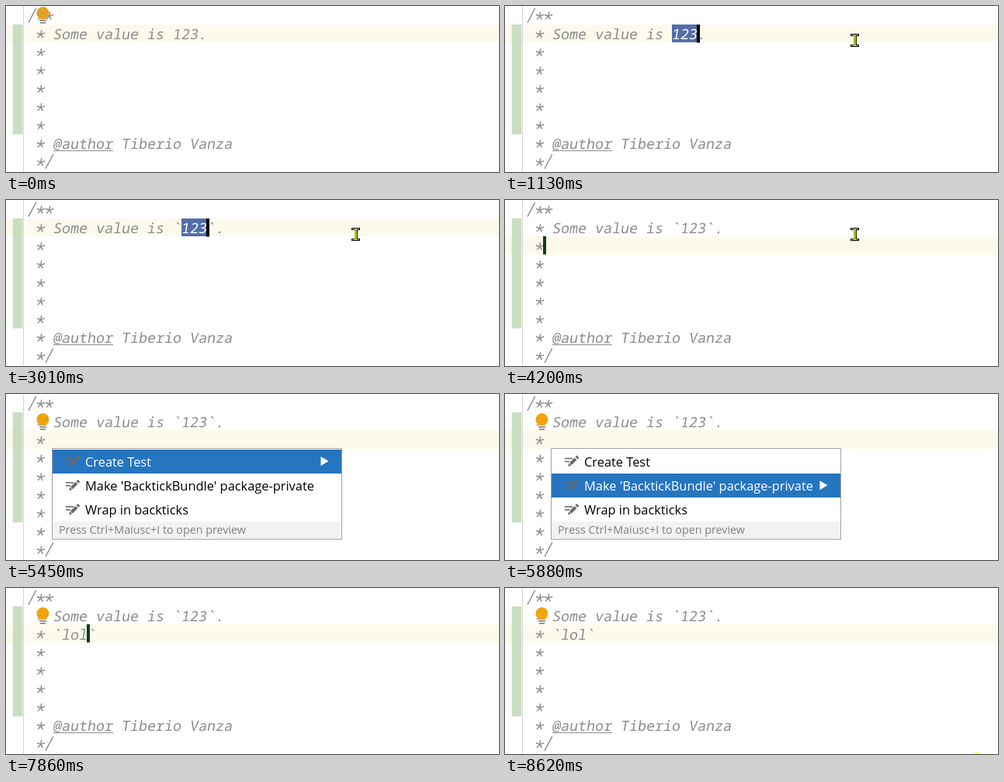
Recreate the animation shown at these times as an HTML page with a canvas. Size 635 by 215 pixels, loop 8.75 s.

```html
<!DOCTYPE html>
<html lang="en">
<head>
<meta charset="utf-8">
<style>
html, body { margin: 0; width: 100%; height: 100%; overflow: hidden; background: #fff; }
canvas { display: block; }
</style>
</head>
<body>
<canvas id="stage" width="635" height="215"></canvas>
<script>
const ctx = document.getElementById('stage').getContext('2d');
const LOOP = 8750, COL = 11, ROW = 23.67, LEFT = 28, GRAY = '#8c8c8c';
const CODE = '18.33px "Noto Sans Mono", monospace';
const UI = '"Open Sans", sans-serif';
const ITEMS = ['Create Test', "Make 'BacktickBundle' package-private",
  'Wrap in backticks', 'Adjust code style settings'];

// Each track is a list of [start time, value]; values hold until the next entry.
const BULB = [[0, 0], [730, null], [1510, 0], [3010, null], [5380, 1], [6310, null], [7860, 1]];
const CARET = [[0, null], [730, [1, 19]], [800, [1, 20]], [1600, null], [2940, [1, 20]],
  [3010, [1, 21]], [3770, [1, 22]], [4200, [2, 2]], [4950, [2, 3]], [5380, null],
  [6310, [2, 4]], [6690, [2, 5]], [6870, [2, 6]], [7000, [2, 7]], [8040, null]];
const SELECTION = [[0, null], [800, 17], [3010, 18], [3640, null]];
const TYPED = [[0, ''], [6310, '``'], [6690, '`l`'], [6870, '`lo`'], [7000, '`lol`']];
const MENU = [[0, null],
  [1600, [246.5, 46.5, 4, 0]], [2250, [246.5, 46.5, 4, 1]], [2370, [246.5, 46.5, 4, 2]], [2940, null],
  [5420, [59.5, 70.5, 3, 0]], [5880, [59.5, 70.5, 3, 1]], [6010, [59.5, 70.5, 3, 2]], [6260, null]];

const at = (track, t) => track.findLast(([start]) => start <= t)[1];
const colX = col => LEFT + col * COL;
const rowY = row => Math.round(row * ROW);

function rect(color, x, y, w, h) {
  ctx.fillStyle = color;
  ctx.fillRect(x, y, w, h);
}

function line(...points) {
  ctx.beginPath();
  points.forEach(([x, y]) => ctx.lineTo(x, y));
  ctx.stroke();
}

function label(text, x, y, font, color) {
  ctx.font = font;
  ctx.fillStyle = color;
  ctx.fillText(text, x, y);
}

// Slanted code text; asterisks have five arms and slashes are long strokes.
function code(text, row, col, color = GRAY) {
  ctx.save();
  ctx.transform(1, 0, -0.16, 1, colX(col) - 0.7, 19.5 + row * ROW);
  label(text.replace(/[*/]/g, ' '), 0, 0, CODE, color);
  ctx.strokeStyle = color;
  ctx.lineWidth = 1.5;
  [...text].forEach((char, i) => {
    const x = i * COL;
    if (char === '/') line([x + 2, 2], [x + 8.8, -16.5]);
    if (char !== '*') return;
    for (let arm = 0; arm < 5; arm++) {
      const angle = (arm * 0.4 - 0.5) * Math.PI;
      line([x + 5.5, -6.5], [x + 5.5 + 5.4 * Math.cos(angle), -6.5 + 5.4 * Math.sin(angle)]);
    }
  });
  ctx.restore();
}

function bulb(row) {
  const y = 9 + row * 24;
  ctx.fillStyle = row ? '#f0a30a' : '#e2a224';
  ctx.beginPath();
  ctx.arc(47.5, y, 8, 0.72 * Math.PI, 0.28 * Math.PI);
  ctx.lineTo(51, y + 8);
  ctx.lineTo(44, y + 8);
  ctx.fill();
  rect('#747474', 43, y + 9, 9, 1.5);
  rect('#747474', 44, y + 12, 7, 1.5);
}

function pencil(x, y) {
  ctx.strokeStyle = ctx.fillStyle = '#6a6a6a';
  ctx.lineWidth = 1.6;
  line([x, y + 2.5], [x + 10, y + 2.5]);
  line([x, y + 6.5], [x + 6, y + 6.5]);
  ctx.lineWidth = 4;
  line([x + 7.5, y + 9.5], [x + 14, y + 3]);
  line([x + 15, y + 2], [x + 17, y]);
  ctx.beginPath();
  ctx.moveTo(x + 4, y + 13);
  ctx.lineTo(x + 5.5, y + 8.5);
  ctx.lineTo(x + 8.5, y + 11.5);
  ctx.fill();
}

function menu([x, y, count, selected]) {
  const step = 31.25, height = count * step;
  rect('#fff', x, y, 373, height + 24);
  rect('#f2f2f2', x, y + 1 + height, 373, 23);
  ITEMS.slice(0, count).forEach((text, i) => {
    const top = y + 1 + i * step, active = i === selected;
    if (active) {
      rect('#2675bf', x + 0.5, Math.round(top), 372, 31);
      ctx.fillStyle = '#fff';
      ctx.beginPath();
      ctx.moveTo(x + 346, top + 9.5);
      ctx.lineTo(x + 356, top + 15.5);
      ctx.lineTo(x + 346, top + 21.5);
      ctx.fill();
    }
    pencil(x + 17.5, top + 9.5);
    label(text, x + 42.5, top + 22, '16.4px ' + UI, active ? '#fff' : '#000');
  });
  label('Press Ctrl+Maiusc+I to open preview', x + 8.5, y + height + 17, '14.3px ' + UI, '#808080');
  ctx.strokeStyle = '#a3a3a3';
  ctx.lineWidth = 1;
  ctx.strokeRect(x, y, 373, height + 24);
}

function pointer(t) {
  const glide = (start, step, first, count, [x0, y0], [x1, y1]) => {
    const p = Math.min(1, (Math.floor((t - start) / step) + first) / count);
    return [Math.round(x0 + (x1 - x0) * p), Math.round(y0 + (y1 - y0) * p)];
  };
  if (t < 100 || (t >= 4950 && t < 8040) || t >= 8440) return null;
  if (t < 1010) return glide(100, 70, 0, 9, [371, 170], [233, 28]);
  if (t < 4950) return glide(1010, 60, 1, 3, [233, 28], [451, 45]);
  return glide(8040, 66, 0, 6, [455, 60], [608, 222]);
}

function ibeam([x, y]) {
  for (const top of [y - 9, y + 5]) {
    rect('#000', x - 6, top, 11, 3);
    rect('#c8c8a0', x - 5, top + 1, 9, 1);
  }
  rect('#a3c21c', x - 2, y - 7, 3, 13);
  rect('#1c2400', x + 1, y - 6, 1, 11);
}

function draw(t) {
  rect('#fff', 0, 0, 635, 215);
  const current = t < 4200 ? 1 : 2;
  const top = rowY(current), height = rowY(current + 1) - top;
  rect('#fcfaed', 0, top, 635, height);
  rect('#fff', 27, top, 1, height);
  rect('#c9dec1', 8.7, 23.7, 12.6, 142.6);
  rect('#d4d4d4', 22, 0, 1, 215);

  code('/**', 0, 0);
  code(` * Some value is ${t < 3010 ? '123' : '`123`'}.`, 1, 0);
  code(' * ' + at(TYPED, t), 2, 0);
  for (let row = 3; row < 7; row++) code(' *', row, 0);
  code(' * @author Tiberio Vanza', 7, 0);
  rect(GRAY, 61, 187, 77, 1);
  code(' */', 8, 0);

  const selection = at(SELECTION, t);
  if (selection !== null) {
    rect('#526eaa', colX(selection), 24, 33, 23);
    code('123', 1, selection, '#fff');
  }
  const caret = at(CARET, t);
  if (caret) rect(caret[0] === 1 ? '#000' : '#123c1c', colX(caret[1]) - 1, rowY(caret[0]), 4, 23.5);
  const bulbRow = at(BULB, t);
  if (bulbRow !== null) bulb(bulbRow);
  const open = at(MENU, t);
  if (open) menu(open);

  const position = pointer(t);
  if (position) ibeam(position);
  if (t >= 8440) {
    ctx.fillStyle = '#ffff55';
    ctx.beginPath();
    ctx.arc(608, t < 8620 ? 225.5 : 225, 12.5, 0, 2 * Math.PI);
    ctx.fill();
  }
}

const begin = performance.now();
function tick() {
  draw((performance.now() - begin) % LOOP);
  requestAnimationFrame(tick);
}
tick();
</script>
</body>
</html>
```
